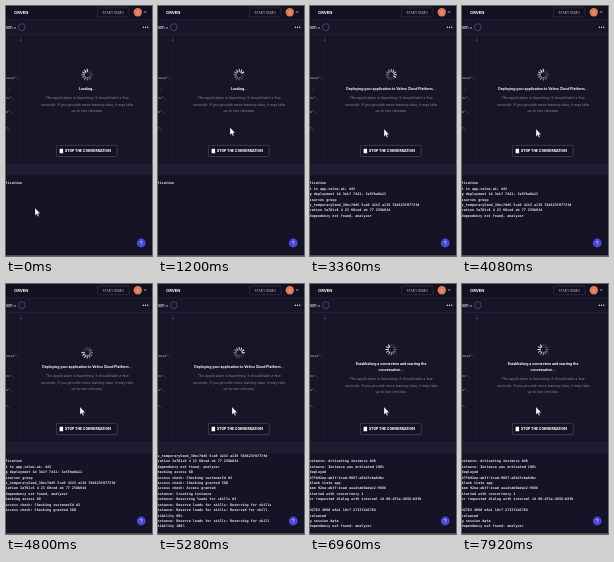
An HTML page that plays this animation: 146 by 250 pixels, repeating every 8000 ms.

```html
<!DOCTYPE html>
<html lang="en">
<head>
<meta charset="utf-8">
<title>Deployment</title>
<style>
html, body { margin: 0; width: 100%; height: 100%; overflow: hidden; background: #171629; }
svg { display: block; width: 100vw; height: 100vh; }
text { font-family: Inter, Roboto, sans-serif; white-space: pre; }
.mono text { font: 3.45px "DejaVu Sans Mono", "Liberation Mono", monospace; }
#log text { font-weight: 700; }
.title text { font-size: 3.45px; font-weight: 700; fill: #fff; text-anchor: middle; }
.note text { font-size: 3.62px; fill: #858498; text-anchor: middle; }
</style>
</head>
<body>
<svg viewBox="0 0 146 250" preserveAspectRatio="none">
  <rect width="146" height="250" fill="#171629"/>
  <rect width="146" height="13.5" fill="#121122"/>
  <path d="M0 13.8H146M0 28.3H146" stroke="#29283a" stroke-width=".6"/>
  <text x="8" y="8" font-size="4.1" font-weight="700" fill="#fff">ORVEN</text>
  <rect x="91.5" y="1.8" width="31.5" height="9" rx="1.2" fill="none" stroke="#38374c" stroke-width=".6"/>
  <text x="107.2" y="7.5" font-size="3.3" font-weight="500" text-anchor="middle" fill="#a3a2b0">START DEMO</text>
  <circle cx="131.8" cy="6.2" r="4.2" fill="#dc7a55"/>
  <text x="131.8" y="7.6" font-size="3.8" text-anchor="middle" fill="#f6ded4">C</text>
  <path d="M137.7 5.5h3l-1.5 1.7z" fill="#9a9aa8"/>

  <text x="-1" y="22.6" font-size="3.8" font-weight="500" fill="#ececf4">ison ×</text>
  <circle cx="15.8" cy="21.2" r="3.4" fill="none" stroke="#5b62a4" stroke-width=".6"/>
  <g fill="#e6e6ee"><circle cx="137.4" cy="21.3" r=".7"/><circle cx="139.6" cy="21.3" r=".7"/><circle cx="141.8" cy="21.3" r=".7"/></g>

  <path d="M14.3 28.5V157" stroke="#211f34" stroke-width=".7"/>
  <path d="M14.3 34h1.6" stroke="#8a899a" stroke-width=".7"/>
  <g class="mono" id="code"></g>

  <g id="spin"></g>
  <g class="title" id="title"></g>
  <g class="note" id="note"></g>

  <rect x="50.4" y="139.4" width="60.8" height="11.2" rx="1.4" fill="#141324" stroke="#55546a" stroke-width=".6"/>
  <rect x="53.6" y="142.7" width="3.5" height="4.6" rx=".4" fill="#fff"/>
  <text x="59" y="146.4" font-size="3.45" font-weight="800" fill="#fff">STOP THE CONVERSATION</text>

  <rect y="157" width="146" height="12.3" fill="#1d1c31"/>
  <rect y="169.3" width="146" height="80.7" fill="#151426"/>
  <path d="M0 157H146" stroke="#100f1b" stroke-width=".6"/>
  <path d="M0 249.5H146" stroke="#4a4956"/>
  <g class="mono" id="log" fill="#e4e4ec"></g>

  <circle cx="135.2" cy="237" r="4.4" fill="#4b48dc"/>
  <text x="135.2" y="238.6" font-size="4.4" font-weight="600" text-anchor="middle" fill="#e8e8ff">?</text>

  <path id="cursor" d="M0 0V7.4L1.7 5.9 2.9 8.6 4 8.1 2.9 5.5H5.2Z" fill="#fff" stroke="#222" stroke-width=".3"/>
</svg>
<script>
const LOOP = 8000, ROWS = 14, LINE = 5.43;
const $ = id => document.getElementById(id);

function add(parent, tag, attrs, text = '') {
  const el = document.createElementNS('http://www.w3.org/2000/svg', tag);
  for (const k in attrs) el.setAttribute(k, attrs[k]);
  el.textContent = text;
  parent.append(el);
  return el;
}

// [time the line is printed, text]
const log = [
  [0, ''],
  [0, 'fication'],
  [1440, 't to app.velmo.ai: 443'],
  [1840, 'g deployment id 3e1f 7441: 3a5fba0a11'],
  [1920, 'sources group'],
  [2000, 's_temporarySand_30ec7dd5 5ca9 4243 a138 584623f0773fd'],
  [2160, 'cation 3a701c6 4 23 60ced ob 77 258b644'],
  [2560, 'dependency not found, analyzer'],
  [4480, 'hecking access 60'],
  [4560, 'access check: Checking customerId #3'],
  [4720, 'access check: Checking granted 5GB'],
  [4880, 'access check: Access granted'],
  [4960, 'nstance: Creating instance'],
  [5040, 'nstance: Reserving loads for skills #3'],
  [5040, 'nstance: Reserve loads for skills: Reserving for skills'],
  [5120, 'nstance: Reserve loads for skills: Reserved for skill'],
  [5120, 'sibility 60%'],
  [5200, 'nstance: Reserve loads for skills: Reserving for skill'],
  [5280, 'sibility 100%'],
  [5360, 'nstance: Reserve loads for skills: Load was reserved'],
  [5440, ''],
  [5440, 'nstance: Activating instance #48'],
  [5600, 'nstance: Instance was activated 100%'],
  [5680, 'deployed'],
  [5760, 'd7fb92ea-ab3f-4cad-9887-a8b23cba84bc'],
  [5760, 'blank state app'],
  [5840, 'ame 92ea-ab3f-4cad uuid=ab0adac2-9886'],
  [6240, 'started with concurrency 1'],
  [6320, 'er requested dialog with internal id 00-d71a-4856-b9fb'],
  [6480, ''],
  [6480, 'd2763 4060 e8e1 19c7 2733f2d2764'],
  [6640, 'released'],
  [6720, 'g session data'],
  [6800, 'dependency not found: analyzer']
];

const titles = [
  [0, ['Loading...']],
  [1520, ['Deploying your application to Velmo Cloud Platform...']],
  [5760, ['Establishing a connection and starting the', 'conversation...']]
];

// [time, x, y]
const path = [
  [0, 29, 202], [160, 29, 202], [880, 72, 121.5],
  [2320, 72, 121.5], [2640, 74, 123], [LOOP, 74, 123]
];

const code = [
  [72.8, 'ease",', '#d8a58a'], [84, ' ,', '#b9b9c6'], [92.6, 'es",', '#d99a6c'],
  [107, 'e",', '#d8b08a'], [124, '",', '#c9c9d4']
];
for (const [y, s, fill] of code) add($('code'), 'text', { x: 0, y, fill }, s);

const notes = [
  'The application is launching. It should take a few',
  'seconds. If you provide more training data, it may take',
  'up to two minutes.'
];
notes.forEach((s, i) => add($('note'), 'text', { x: 81.2, y: 93.2 + i * 6.4 }, s));

const rows = Array.from({ length: ROWS }, (_, i) =>
  add($('log'), 'text', { x: -0.4, y: 172.9 + i * LINE }));
const heads = [0, 1].map(i => add($('title'), 'text', { x: 81.2, y: 84.3 + i * 6.4 }));
const spokes = Array.from({ length: 12 }, (_, i) => add($('spin'), 'path', {
  d: 'M0-2.9V-5.3', stroke: '#fff', 'stroke-width': 1.05, 'stroke-linecap': 'round',
  transform: `rotate(${i * 30})`
}));

const ease = p => p * p * (3 - 2 * p);

function cursorAt(t) {
  const i = path.findIndex(p => p[0] > t);
  const [t0, x0, y0] = path[i - 1], [t1, x1, y1] = path[i];
  const p = ease((t - t0) / (t1 - t0));
  return [x0 + (x1 - x0) * p, y0 + (y1 - y0) * p];
}

function draw(t) {
  const n = log.filter(l => l[0] <= t).length;
  const top = Math.max(0, n - ROWS);
  rows.forEach((r, i) => r.textContent = top + i < n ? log[top + i][1] : '');

  const lines = titles.filter(h => h[0] <= t).pop()[1];
  const shift = (lines.length - 1) * 3.2;
  heads.forEach((h, i) => h.textContent = lines[i] || '');
  $('title').setAttribute('transform', `translate(0 ${-shift})`);
  $('note').setAttribute('transform', `translate(0 ${shift})`);
  $('spin').setAttribute('transform', `translate(81.2 ${68.7 - shift})`);

  const step = Math.floor(t / 1000 * 12);
  spokes.forEach((s, i) => {
    const age = (((step - i) % 12) + 12) % 12;
    s.setAttribute('opacity', Math.max(0.15, 1 - age / 12));
  });
  $('cursor').setAttribute('transform', `translate(${cursorAt(t)})`);
}

const start = performance.now();
function tick() {
  draw((performance.now() - start) % LOOP);
  requestAnimationFrame(tick);
}
tick();
</script>
</body>
</html>
```
